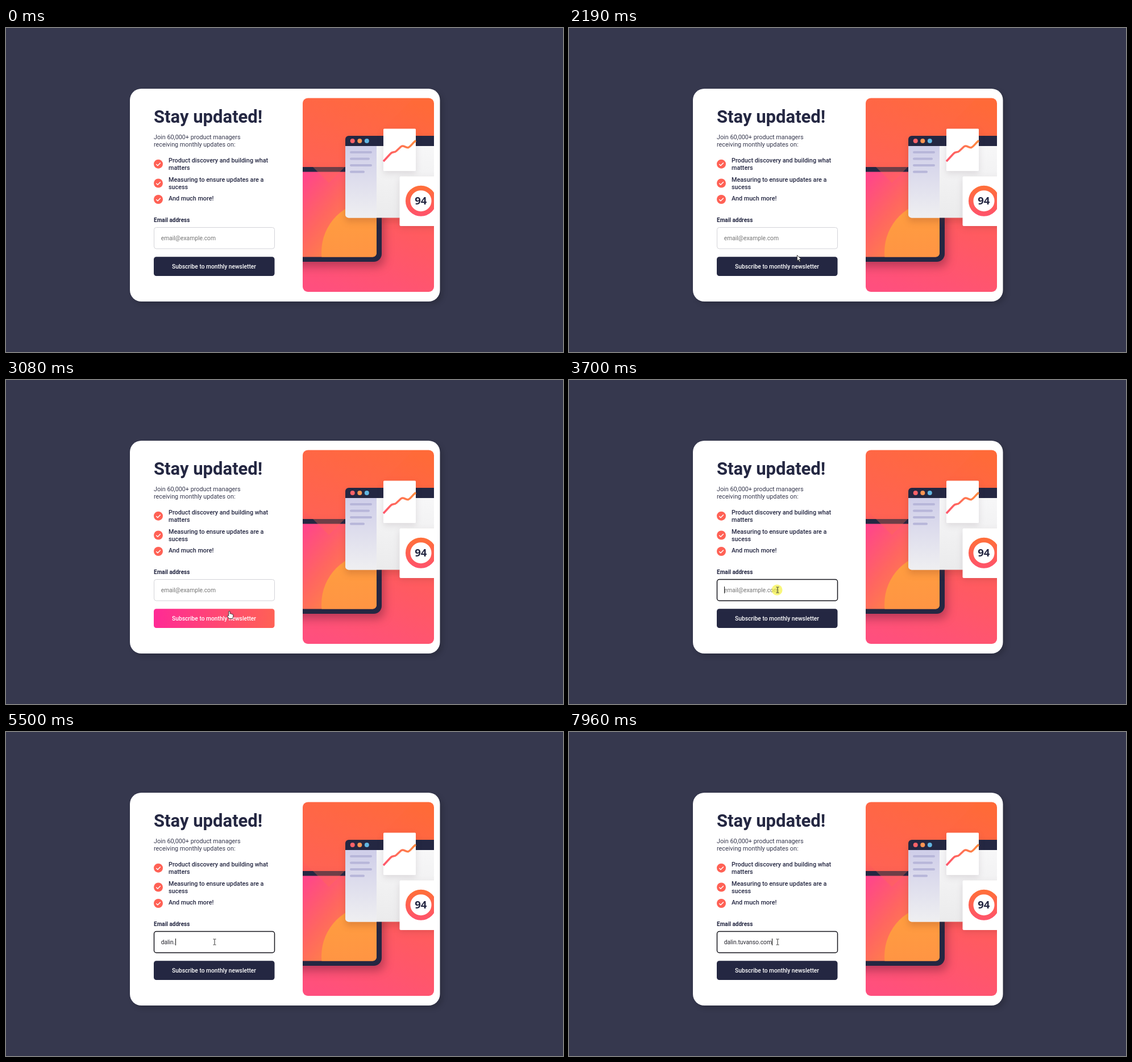
An HTML page that plays this animation: 980 px wide and 571 px high, repeating every 8000 ms.

```html
<!DOCTYPE html>
<html lang="en">
<head>
<meta charset="utf-8">
<title>Newsletter sign-up</title>
<style>
  html, body { margin: 0; width: 100%; height: 100%; overflow: hidden; background: #36384e; }
  svg { display: block; width: 980px; height: 571px; }
  text { font-family: Roboto, sans-serif; font-size: 10.8px; fill: #242742; }
  .title { font-size: 31px; font-weight: 700; }
  .intro { fill: #36384e; }
  .list { font-weight: 500; }
  .label { font-size: 10px; font-weight: 700; }
  .field { font-size: 10.3px; fill: #25252e; }
  .hint { fill: #757575; }
  .action { font-size: 10.25px; font-weight: 500; fill: #fff; text-anchor: middle; }
  .score { font: 700 18.5px "Open Sans", sans-serif; text-anchor: middle; }
  .card { filter: drop-shadow(5px 5px 4px rgba(0, 0, 0, .16)); }
  .tablet { filter: drop-shadow(5px 9px 8px rgba(90, 20, 50, .4)); }
  .window { filter: drop-shadow(0 7px 6px rgba(110, 40, 30, .2)); }
  .sheet { filter: drop-shadow(0 4px 6px rgba(60, 30, 50, .12)); }
  .pointer { fill: #fff; stroke: #222; stroke-width: .9; stroke-linejoin: round; }
</style>
</head>
<body>
<svg viewBox="0 0 980 571">
  <defs>
    <linearGradient id="sky" gradientUnits="userSpaceOnUse" x1="705" y1="124" x2="560" y2="465">
      <stop stop-color="#ff6a38"/><stop offset=".5" stop-color="#ff5d5a"/><stop offset="1" stop-color="#ff4f7e"/>
    </linearGradient>
    <linearGradient id="beam" gradientUnits="userSpaceOnUse" x1="568" y1="273" x2="600" y2="124">
      <stop stop-color="#ff6a50" stop-opacity=".35"/><stop offset="1" stop-color="#ff6a42" stop-opacity=".3"/>
    </linearGradient>
    <linearGradient id="screen" gradientUnits="userSpaceOnUse" x1="522" y1="270" x2="625" y2="350">
      <stop stop-color="#ff4788"/><stop offset=".5" stop-color="#ff6660"/><stop offset="1" stop-color="#ff8744"/>
    </linearGradient>
    <linearGradient id="sun" x2="0" y2="1">
      <stop stop-color="#ff9f3f"/><stop offset="1" stop-color="#ff8c47"/>
    </linearGradient>
    <linearGradient id="side" x2="0" y2="1">
      <stop stop-color="#cfcee9"/><stop offset="1" stop-color="#efeff1"/>
    </linearGradient>
    <linearGradient id="page" x2="0" y2="1">
      <stop stop-color="#f7f7f8"/><stop offset="1" stop-color="#ebebec"/>
    </linearGradient>
    <linearGradient id="ring" x2="0" y2="1">
      <stop stop-color="#ff6e3b"/><stop offset="1" stop-color="#ff5468"/>
    </linearGradient>
    <linearGradient id="trend">
      <stop stop-color="#ff566c"/><stop offset="1" stop-color="#ff8b3e"/>
    </linearGradient>
    <linearGradient id="hover">
      <stop stop-color="#ff2a95"/><stop offset="1" stop-color="#ff6155"/>
    </linearGradient>
    <clipPath id="art"><rect x="522" y="123.500" width="231" height="341.500" rx="9"/></clipPath>
    <clipPath id="glass"><rect x="480" y="253.500" width="172" height="150" rx="7"/></clipPath>
    <clipPath id="frame"><rect x="597" y="190" width="190" height="144.500" rx="6"/></clipPath>
    <g id="tick">
      <circle r="8" fill="#ff6155"/>
      <path d="M-3.700 .3l2.600 2.500 4.900-5.100" fill="none" stroke="#fff" stroke-width="1.500"/>
    </g>
  </defs>

  <rect width="980" height="571" fill="#36384e"/>
  <rect class="card" x="218" y="107" width="545.500" height="375" rx="20" fill="#fff"/>

  <text class="title" x="260" y="166.800">Stay updated!</text>
  <text class="intro" x="260" y="196">Join 60,000+ product managers</text>
  <text class="intro" x="260" y="209">receiving monthly updates on:</text>
  <g class="list">
    <use href="#tick" x="268" y="239.700"/>
    <text x="286" y="237.300">Product discovery and building what</text>
    <text x="286" y="250.300">matters</text>
    <use href="#tick" x="268" y="273.500"/>
    <text x="286" y="271">Measuring to ensure updates are a</text>
    <text x="286" y="284">sucess</text>
    <use href="#tick" x="268" y="302"/>
    <text x="286" y="304.300">And much more!</text>
  </g>

  <text class="label" x="260" y="342.300">Email address</text>
  <rect id="box" x="260.500" y="351.500" width="212" height="37.500" rx="4" fill="#fff"/>
  <rect id="button" x="260" y="403.300" width="212.500" height="33.700" rx="4.500"/>
  <text class="action" x="366" y="423.700">Subscribe to monthly newsletter</text>

  <g clip-path="url(#art)">
    <rect x="522" y="123" width="231" height="343" fill="url(#sky)"/>
    <rect class="tablet" x="480" y="245" width="181" height="167" rx="14" fill="#242742"/>
    <g clip-path="url(#glass)">
      <rect x="480" y="253" width="172" height="151" fill="url(#screen)"/>
      <circle cx="645" cy="395" r="90" fill="url(#sun)"/>
    </g>
    <path d="M568 273L522 227V124H717Z" fill="url(#beam)"/>
    <g class="window">
      <g clip-path="url(#frame)">
        <rect x="597" y="208" width="190" height="127" fill="url(#page)"/>
        <rect x="597" y="208" width="55" height="127" fill="url(#side)"/>
        <rect x="597" y="190" width="190" height="18" fill="#242742"/>
      </g>
    </g>
    <circle cx="609.700" cy="199" r="4" fill="#ff6268"/>
    <circle cx="622.300" cy="199" r="4" fill="#ff9552"/>
    <circle cx="634.800" cy="199" r="4" fill="#62b7e2"/>
    <path d="M607 219h35M607 230.500h31M607 242h35M607 253.500h22" stroke="#b7b6d9" stroke-width="4" stroke-linecap="round"/>
    <rect class="sheet" x="664" y="177.500" width="57" height="74.500" rx="1.500" fill="#fff"/>
    <path d="M664 235L676.500 221.500C680 217.500 683 220 686.500 217L695 209C699 205 703 212 708 210.500C712 209 716 202 721 198.500" fill="none" stroke="url(#trend)" stroke-width="3.500"/>
    <rect class="sheet" x="692.500" y="261.500" width="90" height="87.500" rx="2" fill="#fff"/>
    <circle cx="730" cy="304.700" r="22.800" fill="none" stroke="url(#ring)" stroke-width="8.500"/>
    <text class="score" x="729.700" y="311.300">94</text>
  </g>

  <text id="hint" class="field hint" x="272.700" y="373.700">email@example.com</text>
  <text id="typed" class="field" x="272.700" y="373.700"></text>
  <rect id="caret" y="364" width="1" height="12" fill="#111"/>

  <circle id="click" r="9.500" fill="#f4f02c" fill-opacity=".62"/>
  <g id="cursor">
    <path id="arrow" class="pointer" d="M.3 .3V10.500L2.700 8.300 4.400 12.200 6.200 11.400 4.500 7.600H7.600Z"/>
    <path id="hand" class="pointer" d="M-1.200 1Q0-.6 1.200 1V5Q2.300 4.200 3 5.300 4.300 4.600 4.900 5.900 6.800 5.600 6.800 7.500V10L5.500 13.500H-.8L-3.800 8.700Q-3.500 7-1.200 8.600Z"/>
    <path id="beamCursor" d="M-2.500-5H-.7L0-4.400 .7-5H2.500M-2.500 5H-.7L0 4.400 .7 5H2.500M0-4.400V4.400" fill="none" stroke="#333"/>
  </g>
</svg>
<script>
  const LOOP = 8000, STEP = 67;
  const FOCUS = 3630, BLINK = 4170, CLICK_END = 3830;
  const address = "dalin.tuvanso.com";
  const keyTimes = [4430, 4630, 4760, 5030, 5230, 5500, 5780, 5910, 6110,
                    6310, 6510, 6640, 6970, 7430, 7630, 7760, 7960];
  const linear = p => p;
  const easeOut = p => 1 - (1 - p) ** 1.6;
  const easeInOut = p => p * p * (3 - 2 * p);

  // start time, number of steps, end point, easing
  const moves = [
    [440, 12, 440, 391, easeOut],
    [1250, 4, 423, 371, easeOut],
    [1650, 9, 401, 400, easeInOut],
    [2255, 3, 397, 414, linear],
    [2480, 3, 396, 408, linear],
    [3080, 1, 393, 407, linear],
    [3150, 5, 367, 370, easeOut]
  ];

  const $ = id => document.getElementById(id);
  const show = (id, on) => $(id).setAttribute("visibility", on ? "visible" : "hidden");
  const set = (id, attrs) => {
    for (const name in attrs) $(id).setAttribute(name, attrs[name]);
  };

  function pointerAt(t) {
    let x = 755, y = 573;
    for (const [start, steps, toX, toY, ease] of moves) {
      if (t < start) break;
      const p = ease(Math.min(steps, Math.floor((t - start) / STEP) + 1) / steps);
      x += (toX - x) * p;
      y += (toY - y) * p;
    }
    return [x, y];
  }

  function draw(t) {
    const [x, y] = pointerAt(t);
    const inColumn = x > 260 && x < 473;
    const overBox = inColumn && y > 351 && y < 389;
    const overButton = inColumn && y > 403 && y < 437;
    const visible = t >= moves[0][0];
    set("cursor", { transform: `translate(${x} ${y})` });
    show("arrow", visible && !overBox && !overButton);
    show("hand", visible && overButton);
    show("beamCursor", visible && overBox);
    set("button", { fill: overButton ? "url(#hover)" : "#242742" });

    const focused = t >= FOCUS;
    set("box", { stroke: focused ? "#15151c" : "#d3d3d8", "stroke-width": focused ? 1.5 : 1 });
    set("click", { cx: x - 1, cy: y });
    show("click", focused && t < CLICK_END);

    const count = keyTimes.filter(time => t >= time).length;
    $("typed").textContent = address.slice(0, count);
    show("hint", !count);
    const width = count ? $("typed").getComputedTextLength() : 0;
    set("caret", { x: Math.round(272.7 + width) });
    show("caret", focused && (count || t < BLINK));
  }

  function tick() {
    draw(performance.now() % LOOP);
    requestAnimationFrame(tick);
  }
  tick();
</script>
</body>
</html>
```
